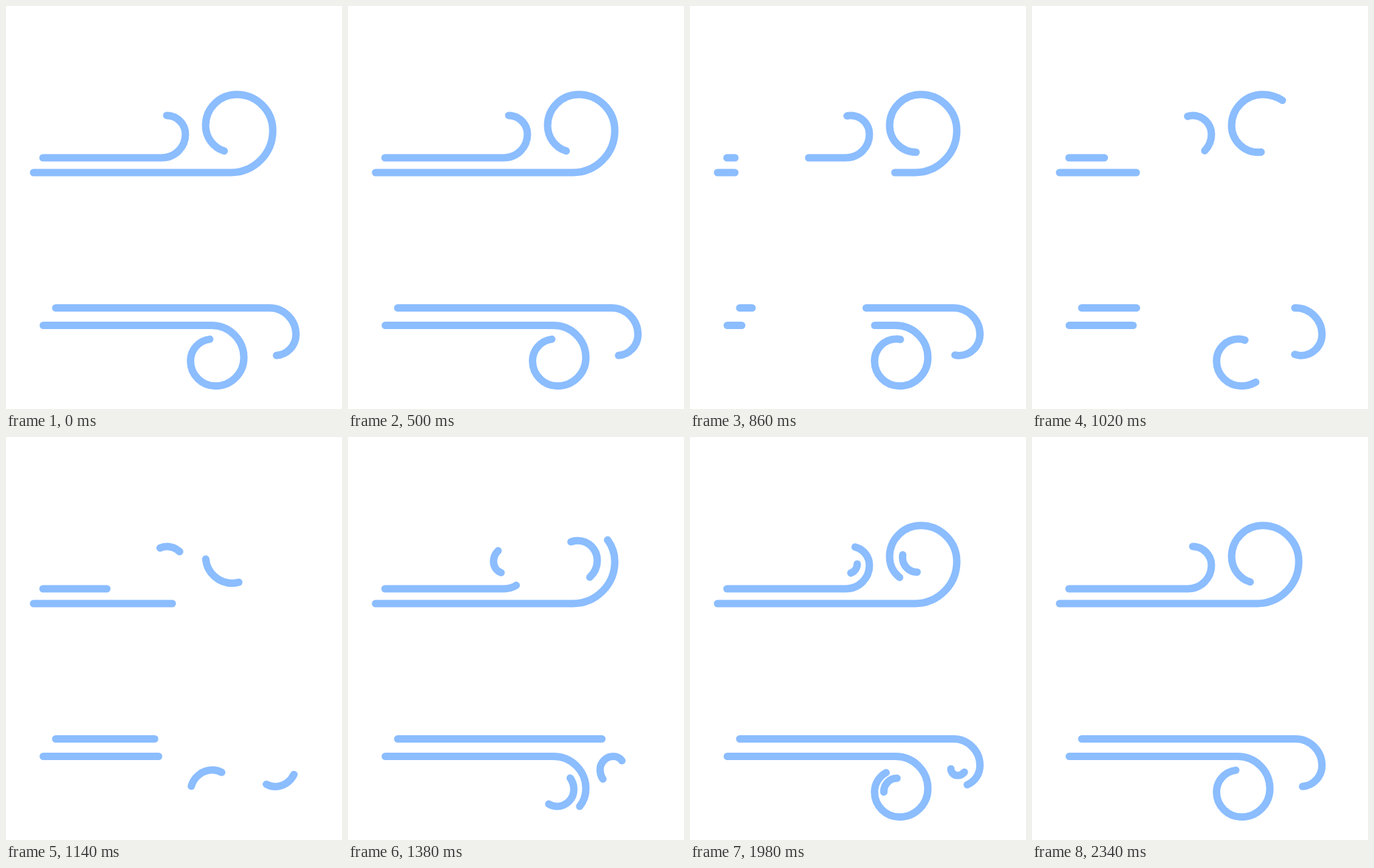
These frames come from a looping animation (500 by 600 pixels, 3060 ms). An HTML page:

```html
<!DOCTYPE html>
<html lang="en">
<head>
<meta charset="utf-8">
<title>Wind</title>
<style>
  html, body { margin: 0; width: 100%; height: 100%; overflow: hidden; background: #fff; }
  svg { display: block; width: 500px; height: 600px; }
  path { fill: none; stroke: #8bbdff; stroke-width: 11; stroke-linecap: round; }
</style>
</head>
<body>
<svg id="stage" viewBox="0 0 500 600"></svg>
<script>
const LOOP = 3060, STEP = 40, PHASE = 20;
const FULL = 1.31;   // whole path, where the gust at rest covers 1

// A straight line from x to bend, then quarter circles that shrink by a fixed ratio
const gusts = [
  { x: 55, y: 226, bend: 232, r: 35, shrink: .8, quarters: 5, turn: -1 },
  { x: 41, y: 248, bend: 334.5, r: 62.5, shrink: .86, quarters: 8, turn: -1 },
  { x: 74, y: 449.5, bend: 392, r: 39.5, shrink: .795, quarters: 7, turn: 1 },
  { x: 55.5, y: 475.5, bend: 306, r: 48, shrink: .88, quarters: 8, turn: 1 }
];

// Time, then how far along the path: tail and head of the old gust, head of the new one
const poses = [
  [530, 0, 1, -.06],
  [860, .441, 1.02, .043],
  [1140, .923, 1.037, .345],
  [1380, 1.063, 1.204, .712],
  [1660, 1.12, 1.34, .92],
  [2320, 1.34, 1.34, 1]
];

// Smooth monotone curve through one column of the poses
function curve(col) {
  const at = i => poses[i][0], val = i => poses[i][col], last = poses.length - 1;
  const slope = i => (val(i + 1) - val(i)) / (at(i + 1) - at(i));
  const speed = i => {
    if (i === 0 || i === last) return 0;
    const a = slope(i - 1), b = slope(i);
    return a * b > 0 ? 2 * a * b / (a + b) : 0;
  };
  return t => {
    if (t <= at(0)) return val(0);
    if (t >= at(last)) return val(last);
    let i = 0;
    while (t >= at(i + 1)) i++;
    const h = at(i + 1) - at(i), u = (t - at(i)) / h, w = 1 - u;
    return w * w * ((1 + 2 * u) * val(i) + u * h * speed(i))
         + u * u * ((1 + 2 * w) * val(i + 1) - w * h * speed(i + 1));
  };
}

const [oldTail, oldHead, newHead] = [1, 2, 3].map(curve);

function outline({ x, y, bend, r, shrink, quarters, turn }) {
  let d = `M${x} ${y}H${bend}`, dx = 1, dy = 0;
  for (let i = 0; i < quarters; i++) {
    const nx = -dy * turn, ny = dx * turn;
    d += `a${r} ${r} 0 0 ${turn > 0 ? 1 : 0} ${(dx + nx) * r} ${(dy + ny) * r}`;
    [dx, dy] = [nx, ny];
    r *= shrink;
  }
  return d;
}

function addPath(d) {
  const p = document.createElementNS('http://www.w3.org/2000/svg', 'path');
  p.setAttribute('d', d);
  p.setAttribute('pathLength', FULL * 1000);
  document.getElementById('stage').append(p);
  return p;
}

function show(p, from, to) {
  p.style.visibility = from < FULL && to > from ? 'visible' : 'hidden';
  p.setAttribute('stroke-dasharray', `${Math.max(0, to - from) * 1000} 4000`);
  p.setAttribute('stroke-dashoffset', -from * 1000);
}

const lines = gusts.map(outline).map(d => ({ old: addPath(d), next: addPath(d) }));

function draw(now) {
  const t = Math.floor((now % LOOP - PHASE) / STEP) * STEP + PHASE;
  for (const l of lines) {
    show(l.old, oldTail(t), oldHead(t));
    show(l.next, 0, newHead(t));
  }
}

const began = performance.now();
function tick() {
  draw(performance.now() - began);
  requestAnimationFrame(tick);
}
tick();
</script>
</body>
</html>
```
